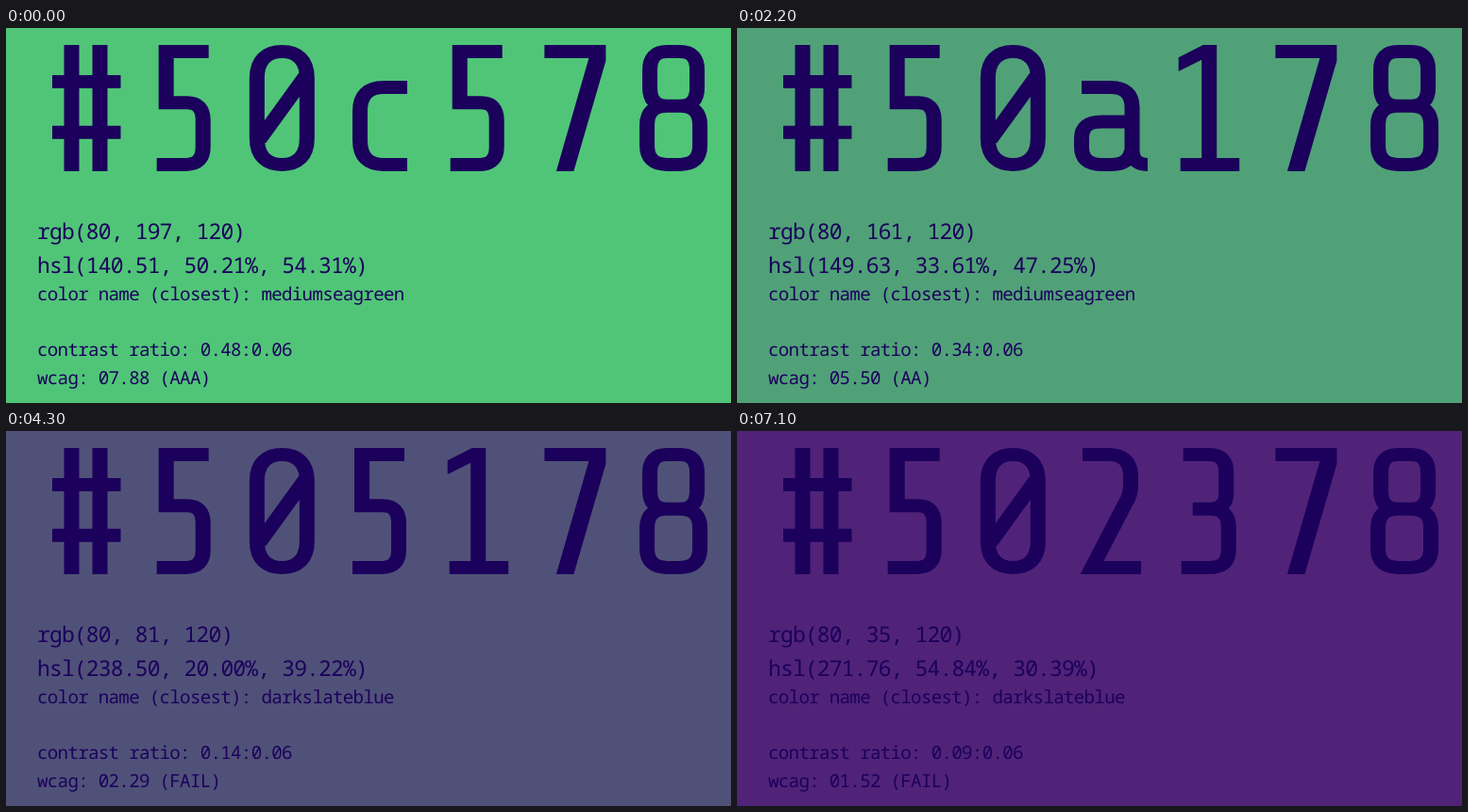
An HTML page that plays this animation: 768 by 398 pixels, repeating every 7.2 s.

```html
<!DOCTYPE html>
<html lang="en">
<head>
<meta charset="utf-8">
<title>Color contrast</title>
<style>
  html, body { margin: 0; width: 100%; height: 100%; overflow: hidden; }
  svg { display: block; width: 768px; height: 398px; }
  text { fill: #1b005c; font-family: "Noto Sans Mono", monospace; font-weight: 300; text-rendering: geometricPrecision; white-space: pre; }
  .large { font-size: 23px; letter-spacing: -.84px; }
  .small { font-size: 19.2px; letter-spacing: -.72px; }
  #hex path { fill: none; stroke: #1b005c; stroke-width: 16; stroke-miterlimit: 8; }
  #hex path.solid { fill: #1b005c; stroke: none; }
</style>
</head>
<body>
<svg viewBox="0 0 768 398">
  <g id="hex" role="img"></g>
  <text id="rgb" class="large" x="33" y="223.5"></text>
  <text id="hsl" class="large" x="33" y="259.5"></text>
  <text id="name" class="small" x="33" y="288.5"></text>
  <text id="contrast" class="small" x="33" y="347.5"></text>
  <text id="wcag" class="small" x="33" y="378"></text>
</svg>
<script>
const LOOP = 7200, STEP = 100, RED = 80, BLUE = 120;
const INK_LUMINANCE = 0.010896;
const CELL = 103.68, LEFT = 33, TOP = 18;
const FLATTEN = 0.875; // makes horizontal strokes thinner than vertical ones

// Green channel over time: [ms, value]
const KEYS = [[1100, 197], [1300, 195], [2200, 161], [2900, 128], [4300, 81], [5500, 45], [6100, 35]];

const NAMES = {
  mediumseagreen: [60, 179, 113], seagreen: [46, 139, 87], cadetblue: [95, 158, 160],
  slategrey: [112, 128, 144], dimgrey: [105, 105, 105],
  darkslateblue: [72, 61, 139], indigo: [75, 0, 130]
};

// Stroked letterforms, 153 units tall; the ones in SOLID are filled outlines.
const GLYPHS = {
  '#': 'M36.5 0V153M66.5 0V153M16 44.5H88.5M16 106H88.5',
  0: 'M25.5 40C25.5 18 36 8 52 8S78.5 18 78.5 40V113C78.5 135 68 145 52 145S25.5 135 25.5 113ZM28 115L78 36',
  1: 'M60.5 0H46L20 15V32L44.5 18V137H22V153H84.5V137H60.5Z',
  2: 'M22 8H49Q73 8 73 34V45Q73 57 67 68L32 145H84',
  3: 'M25 8H52Q70.5 8 70.5 29V55Q70.5 74 53 74H35M53 74Q73 74 73 95V124Q73 145 53 145H23',
  4: 'M45 0L24 114H88M69 60V153',
  5: 'M78 8H33V70H55Q72 70 72 91V124Q72 145 54 145H23',
  6: 'M74 8H54Q25.5 8 25.5 42V120Q25.5 145 47 145H57Q78.5 145 78.5 120V93Q78.5 68 57 68H25.5',
  7: 'M19 0H84V19L50 153H31.5L66 16H19Z',
  8: 'M45 8H59Q77 8 77 30V52Q77 74 59 74H45Q27 74 27 52V30Q27 8 45 8Z' +
     'M45 74H59Q80 74 80 97V122Q80 145 59 145H45Q24 145 24 122V97Q24 74 45 74Z',
  9: 'M30 145H50Q78.5 145 78.5 111V33Q78.5 8 57 8H47Q25.5 8 25.5 33V60Q25.5 85 47 85H78.5',
  a: 'M21 51.5H52Q74.5 51.5 74.5 76V128Q75 145 91 145M74.5 93H42Q21 93 21 113V124Q21 145 42 145H53Q72 145 74.5 126',
  b: 'M24.5 0V153M24.5 51.5H56Q80.5 51.5 80.5 80V117Q80.5 145 58 145H48Q30 145 26 126',
  c: 'M81 51.5H56Q31 51.5 31 80V116Q31 145 56 145H81',
  d: 'M79.5 0V153M79.5 51.5H48Q23.5 51.5 23.5 80V117Q23.5 145 46 145H56Q74 145 78 126',
  e: 'M78 145H50Q25.5 145 25.5 116V81Q25.5 51.5 52 51.5Q78.5 51.5 78.5 80V103H25.5',
  f: 'M84 8H66Q47 8 47 32V153M22 51.5H80'
};
const SOLID = '17';

const byId = id => document.getElementById(id);
const setText = (id, value) => { byId(id).textContent = value; };

// Smooth curve through the keys, level at both ends
function greenAt(time) {
  const last = KEYS.length - 1;
  if (time <= KEYS[0][0]) return KEYS[0][1];
  if (time >= KEYS[last][0]) return KEYS[last][1];
  const slope = i => i === 0 || i === last ? 0
    : (KEYS[i + 1][1] - KEYS[i - 1][1]) / (KEYS[i + 1][0] - KEYS[i - 1][0]);
  const i = KEYS.findIndex(key => key[0] > time) - 1;
  const [t0, v0] = KEYS[i], [t1, v1] = KEYS[i + 1];
  const span = t1 - t0, u = (time - t0) / span, w = 1 - u;
  return Math.round(v0 * w * w * (1 + 2 * u) + v1 * u * u * (3 - 2 * u)
    + span * u * w * (slope(i) * w - slope(i + 1) * u));
}

function toHsl([r, g, b]) {
  const max = Math.max(r, g, b), min = Math.min(r, g, b), range = max - min, sum = max + min;
  const hue = max === g ? 120 + 60 * (b - r) / range : 240 + 60 * (r - g) / range;
  return [hue, 100 * range / (sum > 255 ? 510 - sum : sum), sum / 5.1];
}

function luminance(color) {
  const [r, g, b] = color.map(c => c / 255)
    .map(c => c <= 0.03928 ? c / 12.92 : ((c + 0.055) / 1.055) ** 2.4);
  return 0.2126 * r + 0.7152 * g + 0.0722 * b;
}

function closestName(color) {
  const distance = name => NAMES[name].reduce((sum, c, i) => sum + (c - color[i]) ** 2, 0);
  return Object.keys(NAMES).reduce((best, name) => distance(name) < distance(best) ? name : best);
}

function drawHex(hex) {
  byId('hex').setAttribute('aria-label', hex);
  byId('hex').innerHTML = [...hex].map((char, i) =>
    `<path class="${SOLID.includes(char) ? 'solid' : ''}"
      transform="translate(${LEFT + i * CELL} ${TOP}) scale(1 ${FLATTEN})" d="${GLYPHS[char]}"/>`
  ).join('');
}

function show(green) {
  const color = [RED, green, BLUE];
  const hex = '#' + color.map(c => c.toString(16).padStart(2, '0')).join('');
  const [h, s, l] = toHsl(color).map(v => v.toFixed(2));
  const light = luminance(color) + 0.05, dark = INK_LUMINANCE + 0.05;
  const ratio = Math.floor(100 * light / dark) / 100;
  const grade = ratio >= 7 ? 'AAA' : ratio >= 4.5 ? 'AA' : ratio >= 3 ? 'AA LARGE' : 'FAIL';

  document.body.style.background = hex;
  drawHex(hex);
  setText('rgb', `rgb(${color.join(', ')})`);
  setText('hsl', `hsl(${h}, ${s}%, ${l}%)`);
  setText('name', `color name (closest): ${closestName(color)}`);
  setText('contrast', `contrast ratio: ${light.toFixed(2)}:${dark.toFixed(2)}`);
  setText('wcag', `wcag: ${ratio.toFixed(2).padStart(5, '0')} (${grade})`);
}

const start = performance.now();
let shown;
function tick() {
  const time = (performance.now() - start) % LOOP;
  const green = greenAt(Math.floor(time / STEP) * STEP);
  if (green !== shown) show(shown = green);
  requestAnimationFrame(tick);
}
tick();
</script>
</body>
</html>
```
